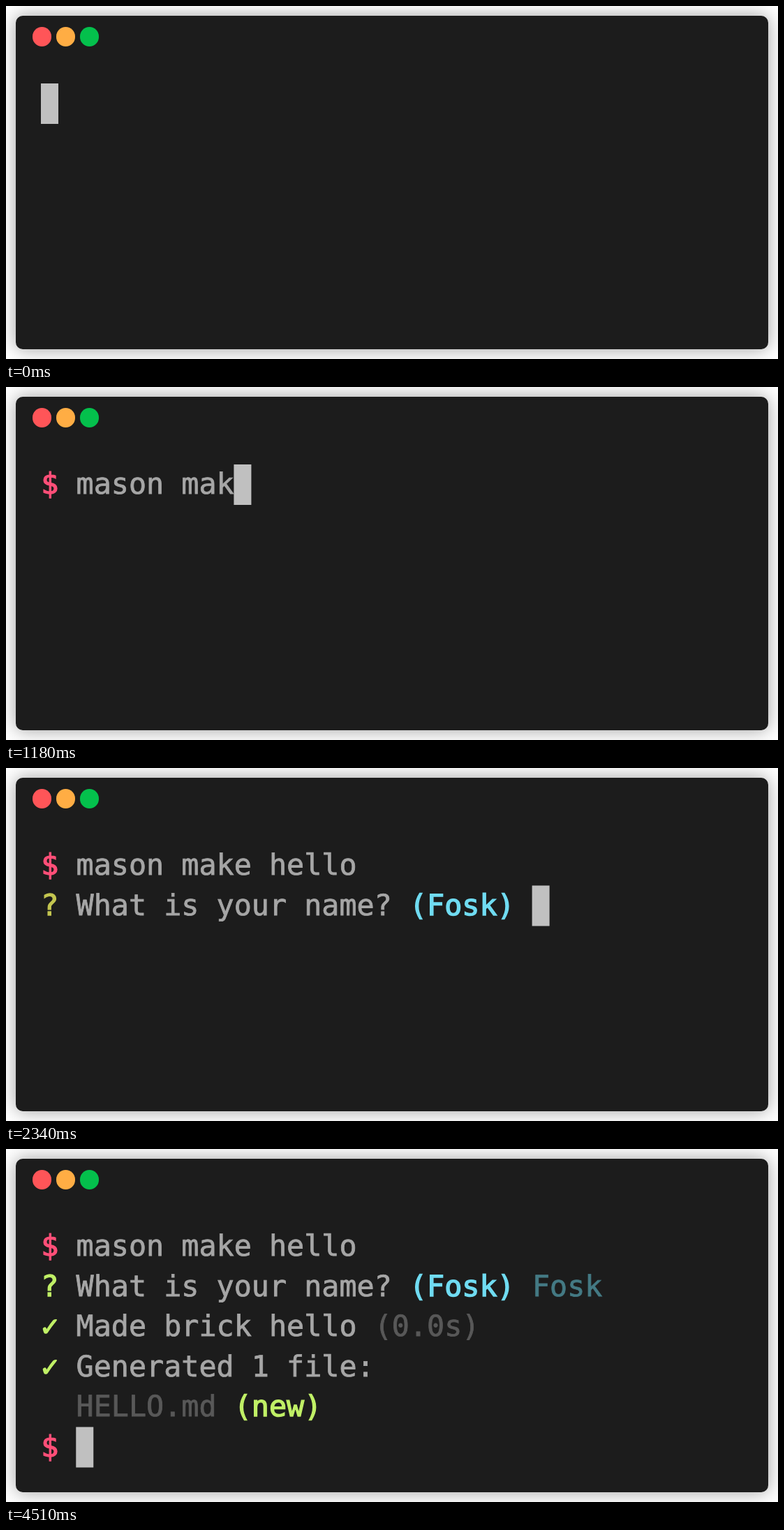
Recreate the animation shown at these times as an HTML page. Size 1106x506 px, loop 8510 ms.

```html
<!DOCTYPE html>
<html lang="en">
<head>
<meta charset="utf-8">
<title>Terminal</title>
<style>
  html, body { margin: 0; width: 100%; height: 100%; overflow: hidden; background: #fff; }
  #window {
    position: absolute; left: 14px; top: 14px; width: 1078px; height: 478px;
    border-radius: 10px; background: #1c1c1c; box-shadow: 0 0 27px rgba(0, 0, 0, .38);
  }
  .dot { position: absolute; top: 30px; width: 27.5px; height: 27.5px; border-radius: 50%; }
  #text, #cursor {
    position: absolute; left: 50.3px; margin: 0;
    font: 41.74px/57.5px "DejaVu Sans Mono", monospace;
    text-rendering: geometricPrecision;
  }
  #text { top: 110px; color: #a6a6a6; white-space: pre; -webkit-text-stroke: .8px; }
  #cursor { top: 111px; width: 25.13px; height: 57.5px; background: #c0c0c0; }
  .prompt, .ask, .hint, .ok, .new { -webkit-text-stroke: 1.4px; }
  .prompt { color: #ff4f78; }
  .hint { color: #70dcf2; }
  .answer { color: #447a84; }
  .dim { color: #585858; }
  .ok, .new { color: #c0f066; }
</style>
</head>
<body>
<div id="window"></div>
<div class="dot" style="left:37.5px;background:#ff5558"></div>
<div class="dot" style="left:71.5px;background:#ffad44"></div>
<div class="dot" style="left:105.5px;background:#04c04c"></div>
<div id="cursor"></div>
<pre id="text"></pre>
<script>
const LOOP = 8510, CELL = 25.13, ROW = 57.5;
const command = "mason make hello";
const keyTimes = [370, 460, 540, 620, 700, 870, 1020, 1100, 1180, 1270, 1330, 1500, 1600, 1700, 1810, 1960];
const text = document.getElementById("text");
const cursor = document.getElementById("cursor");
const span = (name, s, style = "") => `<span class="${name}" style="${style}">${s}</span>`;
const prompt = span("prompt", "$") + " ";
const check = span("ok", "✓") + " ";
let shown = "";

// Returns the screen content and the cursor cell at time t.
function screen(t) {
  if (t < keyTimes[0]) return ["", 0, 0];
  const typed = keyTimes.filter(k => k <= t).length;
  const lines = [prompt + command.slice(0, typed)];
  if (t < 2110) return [lines[0], 2 + typed, 0];
  if (t < 2340) return [lines[0], 0, 1];

  const askColor = t < 3780 ? "#c4c650" : t < 4480 ? "#ceb665" : "#c0f066";
  const question = span("ask", "?", "color:" + askColor) + " What is your name? " + span("hint", "(Fosk)") + " ";
  lines.push(question + (t < 3780 ? "" : span("answer", "Fosk")));
  if (t < 3780) return [lines.join("\n"), 28, 1];
  if (t < 4480) return [lines.join("\n"), 0, 2];

  lines.push(
    check + "Made brick hello " + span("dim", "(0.0s)"),
    check + "Generated 1 file:",
    "  " + span("dim", "HELLO.md") + " " + span("new", "(new)"),
    t < 4510 ? "" : prompt
  );
  return [lines.join("\n"), t < 4510 ? 0 : 2, 5];
}

function draw() {
  const [html, col, row] = screen(performance.now() % LOOP);
  if (html !== shown) text.innerHTML = shown = html;
  cursor.style.transform = `translate(${col * CELL}px, ${row * ROW}px)`;
  requestAnimationFrame(draw);
}
draw();
</script>
</body>
</html>
```
